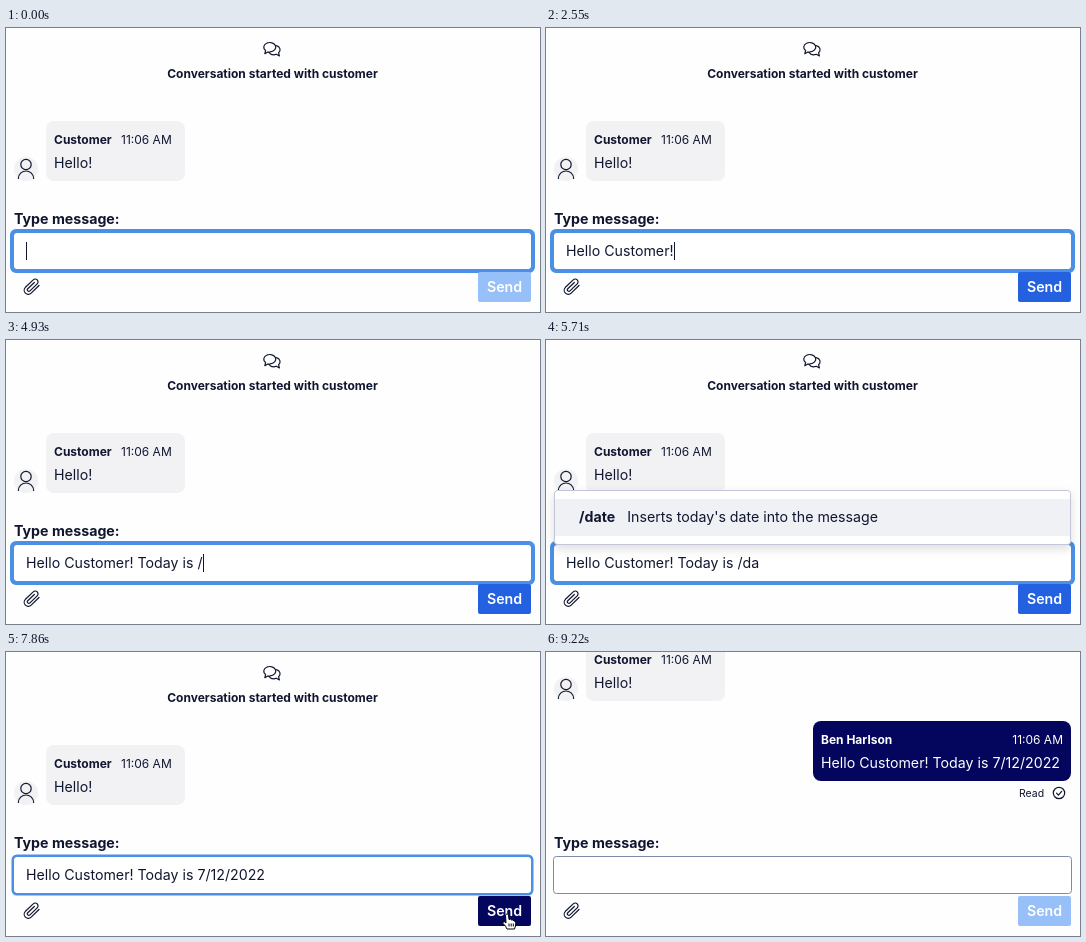
An HTML page that plays this animation: 534 px wide and 284 px high, repeating every 9.52 s.

```html
<!DOCTYPE html>
<html lang="en">
<head>
<meta charset="utf-8">
<title>Chat commands</title>
<style>
  html, body { margin: 0; width: 100%; height: 100%; overflow: hidden; background: #fefefe; }
  svg { display: block; font: 14.2px Inter, sans-serif; fill: #10162f; }
  text { white-space: pre; }
  .bold { font-weight: 600; }
  .title { font-weight: 700; }
  .small { font-size: 12px; }
  .line { fill: none; stroke: #10162f; stroke-width: 1.2; stroke-linecap: round; stroke-linejoin: round; }
  #popup { filter: drop-shadow(0 4px 5px rgba(0, 0, 0, .13)); }
</style>
</head>
<body>
<svg width="534" height="284" viewBox="0 0 534 284">
  <g id="chat">
    <g class="line">
      <path d="M261.5 24.2 L258.8 25.6 L259.6 22.6 A6 4.7 0 1 1 264 23.9 Q262.600 23.900 261.500 24.200"/>
      <path d="M270.400 17.600 A5 4.300 0 0 1 272.600 24.800 L273.400 28 L270.300 26.300 A6 5 0 0 1 262.900 24.300"/>
    </g>
    <text class="title small" x="266.500" y="50" text-anchor="middle">Conversation started with customer</text>
    <rect x="40" y="93" width="139" height="60" rx="8" fill="#f2f2f5"/>
    <text class="title small" x="48" y="116">Customer</text>
    <text class="small" x="115" y="116">11:06 AM</text>
    <text x="48" y="140">Hello!</text>
    <circle cx="20" cy="141" r="12" fill="#f2f2f5"/>
    <g class="line" stroke-width="1.400">
      <circle cx="20" cy="136.500" r="5.200"/>
      <path d="M12.300 150.500 C13 140.500 27 140.500 27.700 150.500"/>
    </g>
    <g id="reply">
      <rect x="267" y="173" width="258" height="60" rx="8" fill="#04055c"/>
      <g fill="#fff">
        <text class="title small" x="275" y="196">Ben Harlson</text>
        <text class="small" x="517" y="196" text-anchor="end">11:06 AM</text>
        <text x="275" y="220">Hello Customer! Today is 7/12/2022</text>
      </g>
      <g id="read">
        <text x="473" y="249" font-size="10.500">Read</text>
        <g class="line">
          <circle cx="513" cy="245" r="5.700"/>
          <path d="M510.500 245.200 l1.900 1.900 l3.300 -3.700"/>
        </g>
      </g>
    </g>
  </g>

  <text class="title" x="8" y="196">Type message:</text>
  <rect x="7.500" y="204.500" width="518" height="37" rx="3" fill="#fff" stroke="#8189a8"/>
  <rect id="ring" fill="none" stroke="#4a90e6"/>
  <text id="typed" x="20" y="228"></text>
  <rect id="caret" y="214" width="1" height="18"/>
  <path class="line" d="M33 257.500 L25.200 265.100 A4.100 4.100 0 0 1 19.400 259.300 L27.200 251.900 A2.800 2.800 0 0 1 31.200 255.900 L24 262.900 A1.500 1.500 0 0 1 21.800 260.700 L28.300 254.500"/>
  <rect id="send" x="472" y="244" width="53" height="30" rx="2"/>
  <text class="bold" x="498.500" y="264" text-anchor="middle" fill="#fff">Send</text>

  <g id="popup">
    <rect x="8.500" y="150.500" width="516" height="54" rx="3" fill="#fff" stroke="#c3c6d8"/>
    <rect id="row" x="9" y="159" width="515" height="37" fill="#f0f1f5"/>
    <text class="title" id="command" x="33" y="182"></text>
    <text id="hint" y="182"></text>
  </g>

  <g id="pointer" stroke-linejoin="round">
    <path id="arrow" d="M0 0 V14 L3.300 11 L5.500 16 L7.800 15 L5.700 10.200 H10 Z" fill="#000" stroke="#fff"/>
    <g id="hand" stroke="#000">
      <path d="M-1.500 1 Q0 -1.500 1.500 1 L2 5.500 Q3.500 4.500 4.500 6 Q6 5.300 7 7 Q9 6.800 8.800 9 Q8.800 12 7.500 15 H0 Q-1 12 -4 9.500 Q-4.800 7.200 -2.500 7.800 L-1 9 Z" fill="#fff"/>
      <path d="M2 9.500 V12.500 M4.200 9.500 V12.500 M6.300 9.500 V12.500" fill="none"/>
    </g>
  </g>
</svg>
<script>
const LOOP = 9520, SENT = 8040;
const $ = id => document.getElementById(id);
const hello = "Hello Customer!", today = hello + " Today is ";

// [time, text, caret shown]
const typing = [
  [0, "", 1], [50, "", 0], [590, "", 1], [1190, "", 0],
  [1240, "/", 1], [1480, "/h", 1], [1540, "/he", 1], [1720, "/hel", 1], [2310, "/hel", 0],
  [2550, hello, 1], [2850, hello, 0], [3150, hello + " ", 1],
  ...[3330, 3450, 3630, 3690, 3920, 3980, 4100, 4220].map((t, i) => [t, today.slice(0, 17 + i), 1]),
  [4520, today.trimEnd(), 0], [4570, today, 1],
  [4930, today + "/", 1], [5050, today + "/d", 1], [5110, today + "/da", 1], [5710, today + "/da", 0],
  [5950, today + "7/12/2022", 1], [6250, today + "7/12/2022", 0],
  [6850, today + "7/12/2022", 1], [7390, today + "7/12/2022", 0],
  [SENT, "", 0]
];

// [open, row highlighted, close, command, hint]
const menus = [
  [1480, 2130, 2550, "/hello", 'Inserts "Hello (customer name)!" into the message'],
  [5050, 5530, 5950, "/date", "Inserts today's date into the message"]
];

const show = (id, on) => $(id).setAttribute("visibility", on ? "inherit" : "hidden");
const set = (el, attrs) => { for (const k in attrs) el.setAttribute(k, attrs[k]); };
const ramp = (t, a, b) => Math.min(1, Math.max(0, (t - a) / (b - a)));

function drawInput(t) {
  const [, text, caret] = typing.findLast(s => s[0] <= t);
  $("typed").textContent = text;
  show("caret", caret);
  set($("caret"), { x: Math.round(20 + (text ? $("typed").getComputedTextLength() : 0)) });

  const w = t < 7860 ? 4 : 2.5;
  show("ring", t < 7920);
  set($("ring"), { x: 8 - w / 2, y: 205 - w / 2, width: 517 + w, height: 36 + w, rx: 4, "stroke-width": w });
}

function drawMenu(t) {
  const menu = menus.find(m => t >= m[0] && t < m[2]);
  show("popup", menu);
  if (!menu) return;
  show("row", t >= menu[1]);
  $("command").textContent = menu[3];
  $("hint").textContent = menu[4];
  set($("hint"), { x: 45 + $("command").getComputedTextLength() });
}

function drawPointer(t) {
  const enter = 1 - (1 - ramp(t, 7390, 7690)) ** 2, leave = ramp(t, 8870, 9220) ** 2;
  const x = 501 + 21 * (1 - enter) + 4 * leave;
  const y = 262 + 24 * (1 - enter) + 24 * leave;
  const over = y < 274;
  set($("pointer"), { transform: `translate(${x} ${y})` });
  show("pointer", t >= 7390 && t < 9220);
  show("hand", over);
  show("arrow", !over);
  const idle = t < 1240 || t >= SENT ? "#97c0f8" : "#2461e0";
  set($("send"), { fill: over ? "#04055c" : idle });
}

function draw(t) {
  set($("chat"), { transform: `translate(0 ${t < SENT ? 0 : -104})` });
  show("reply", t >= SENT);
  show("read", t >= 8210);
  drawInput(t);
  drawMenu(t);
  drawPointer(t);
}

const start = performance.now();
function tick() {
  draw((performance.now() - start) % LOOP);
  requestAnimationFrame(tick);
}
tick();
</script>
</body>
</html>
```
